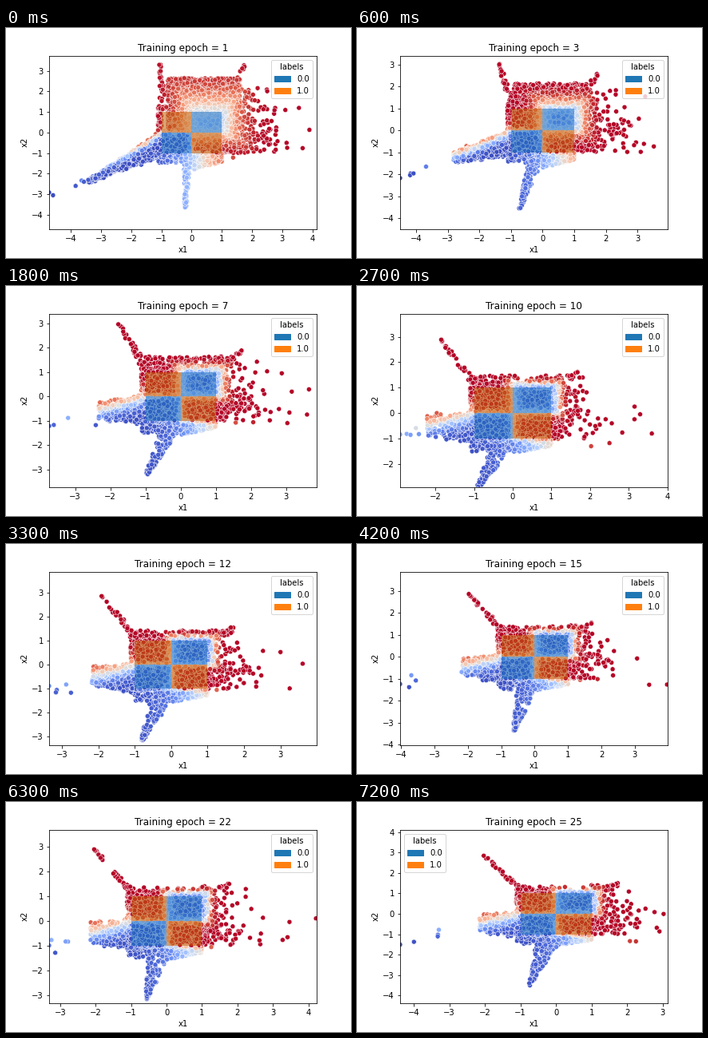
These frames come from a looping animation (432x288 px, 7.5 s). A matplotlib script:

```python
import numpy as np
import matplotlib.pyplot as plt
from matplotlib.animation import FuncAnimation
from matplotlib.patches import Patch, Rectangle

EPOCHS = 25
BLUE, ORANGE = (0.14, 0.46, 0.76), (0.77, 0.39, 0.06)

plt.rcParams.update({"font.size": 10, "font.family": "DejaVu Sans"})

# View limits at a few key epochs; both axes share the lower one.
KEYS = [1, 5, 10, 15, 19, 22, 25]
LOW = [-4.72, -4.29, -2.91, -4.03, -2.81, -3.315, -4.385]
RIGHT = [4.135, 3.77, 4.003, 3.98, 3.90, 4.23, 3.14]
TOP = [3.75, 3.06, 3.91, 3.87, 2.97, 3.69, 4.13]


def view(epoch):
    return [np.interp(epoch, KEYS, row) for row in (LOW, RIGHT, TOP)]


def lerp(a, b, t):
    return a + (b - a) * t


def fade(epoch, tau):
    """Decays from 1 at the first epoch."""
    return np.exp(-(epoch - 1) / tau)


def left_tip(epoch):
    return -2.15 - 1.3 * fade(epoch, 3), -0.45 - 1.95 * fade(epoch, 2.2)


def arm(rng, n, start, tip, width, power):
    """Points thinning out from start to tip, narrowing on the way."""
    t = rng.random(n) ** power
    spread = width * (1 - t) + 0.03
    x = lerp(start[0], tip[0], t) + spread * rng.uniform(-1, 1, n)
    y = lerp(start[1], tip[1], t) + 0.5 * spread * rng.uniform(-1, 1, n)
    return x, y


def samples(epoch):
    rng = np.random.default_rng(100 + epoch)
    u = rng.random
    low, right, _ = view(epoch)
    early = fade(epoch, 3)
    lip = 0.35 + 1.3 * fade(epoch, 4)
    parts = []

    # Central square, with its upper left corner still open at first
    x, y = rng.uniform(-1, 1, (2, 5200)) + rng.normal(0, 0.035, (2, 5200))
    keep = (x > -1.1 + 0.32 * early) | (y < 0.05)
    parts.append((x[keep], y[keep]))

    # Fringes above, to the right and below
    n = int(450 * lip + 500 * early)
    parts.append((rng.uniform(-1.05 + 0.25 * early, 1.2 + 0.4 * early, n),
                  1 + lip * u(n) ** lerp(2.6, 1.1, early)))
    n = int(150 + 400 * early)
    parts.append((1 + rng.exponential(0.3 + 0.13 * early, n),
                  rng.uniform(-1, 1.2 + 0.6 * lip, n)))
    parts.append((1 + (1.3 + early) * u(40) ** 1.5, rng.normal(-0.3, 0.3, 40)))
    x = u(300)
    depth = (0.55 + 0.3 * early) * (1 - 0.5 * x)
    parts.append((x, -1 - depth * u(300) ** 1.7))
    parts.append((rng.uniform(-1.1, 0, 150), -1 - 0.5 * u(150) ** 2.2))
    parts.append((-1 - 0.12 * u(40), u(40) * 1.3))

    # Left wedge
    tx, ty = left_tip(epoch)
    n = int(330 + 700 * early)
    v, t = u(n), u(n) ** 1.9
    band = 0.8 * (1 - early)
    y = lerp(-1.1 * v, ty + band * (0.5 - v), t) + rng.normal(0, 0.05, n)
    parts.append((lerp(-1, tx, t), y))

    # Long thin arms
    swing = 0.25 * np.cos(2 * np.pi * (epoch - 7) / 24)
    spur = (-0.75 - swing + 0.55 * fade(epoch, 1.5), 0.35 * low - 2)
    fan = (-2.05 + fade(epoch, 5), 2.9 + 0.4 * early)
    horn = (1.75, 1.5 + 1.8 * fade(epoch, 4))
    parts += [arm(rng, 130, (-0.15, -1), spur, 0.32 - 0.22 * early, 1.3),
              arm(rng, 36, (-0.95, 1.1), fan, 0.1, 1.7),
              arm(rng, 25, (1, 1), horn, 0.2, 1.1)]

    # Strays far out on both sides
    x = np.append(rng.uniform(low, tx, 4), low)
    parts.append((x, (0.3 + 0.35 * early) * x + rng.normal(0, 0.15, 5)))
    parts.append((rng.uniform(1.8, right, 7), rng.normal(-0.6, 0.5, 7)))

    return rng.permutation(np.hstack(parts), axis=1)


def prediction(x, y, epoch):
    """Soft two-block decision field: 0 is blue, 1 is red."""
    early = fade(epoch, 3)
    sharp = np.interp(epoch, [1, 5, 12], [4, 11, 18])
    roof = (1.14 - y) * (1 - 0.5 * early)
    upper = sharp * np.minimum.reduce([x, y, 1.16 - x, roof])
    upper = np.where(upper > 0, 0.6 * upper, upper)

    tx, ty = left_tip(epoch)
    reach = np.clip((x + 1) / (tx + 1), 0, 1.3) ** 0.8
    over = (1 - 0.15 * early) * ty * reach - y
    over *= np.where(x < -1, 5 + 6 * early, 18)
    edge = np.minimum(4 * np.clip(-0.95 - y, 0, None), 0.9 - 0.6 * early)
    side = np.where(y < -1, 2.2, 18) * (edge - x)
    score = np.maximum(upper, np.minimum(over, side))
    return 1 / (1 + np.exp(np.clip(score, -50, 50)))


fig, ax = plt.subplots(figsize=(6, 4), dpi=72)
fig.subplots_adjust(left=0.125, right=0.9, bottom=0.125, top=0.88)


def draw(i):
    epoch = i + 1
    low, right, top = view(epoch)
    x, y = samples(epoch)
    ax.clear()
    ax.scatter(x, y, c=prediction(x, y, epoch), cmap="coolwarm",
               vmin=0, vmax=1, s=36, edgecolors="w", linewidths=0.5)
    for cx in (-1, 0):
        for cy in (-1, 0):
            ax.add_patch(Rectangle((cx, cy), 1, 1, lw=0, alpha=0.57,
                                   color=BLUE if cx == cy else ORANGE))
    ax.set(xlim=(low, right), ylim=(low, top), xlabel="x1", ylabel="x2",
           title=f"Training epoch = {epoch}")
    ax.legend([Patch(color="C0"), Patch(color="C1")], ["0.0", "1.0"],
              title="labels",
              loc="upper left" if epoch == EPOCHS else "upper right")
    return ax.collections


anim = FuncAnimation(fig, draw, frames=EPOCHS, interval=300, repeat=True,
                     repeat_delay=0, blit=False)
plt.show()
```
